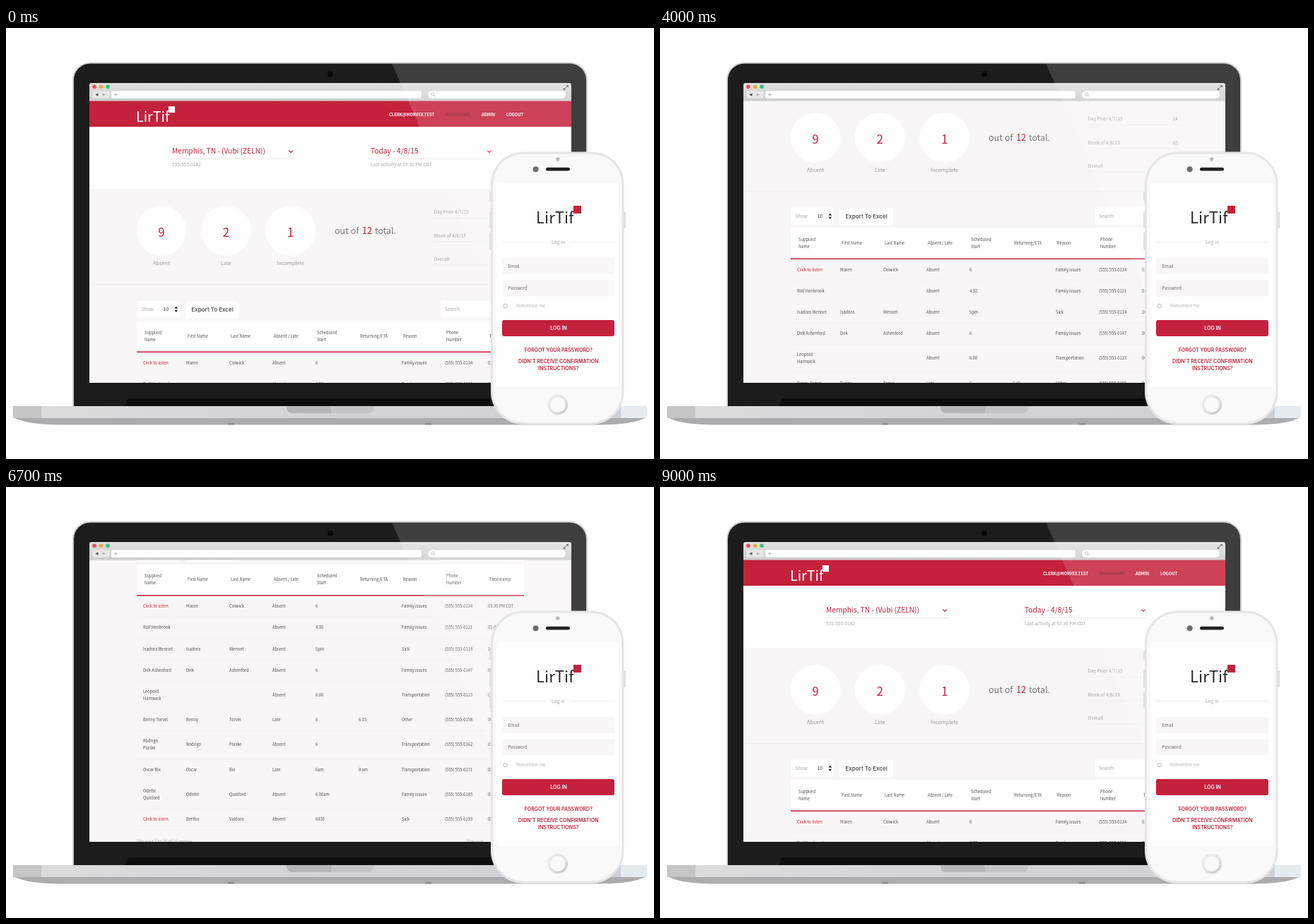
These frames come from a looping animation (917 by 611 pixels, 10 s). An HTML page with a canvas:

```html
<!DOCTYPE html>
<html lang="en">
<head>
<meta charset="utf-8">
<title>Attendance dashboard</title>
<style>
html, body { margin: 0; width: 100%; height: 100%; overflow: hidden; background: #fff; }
canvas { display: block; }
</style>
</head>
<body>
<canvas id="stage" width="917" height="611"></canvas>
<script>
const ctx = document.getElementById('stage').getContext('2d');
const SANS = '"Noto Sans CJK SC", "Noto Sans CJK JP", "Noto Sans CJK", "Open Sans", sans-serif';
const WIDE = 'Inter, "Open Sans", sans-serif';
const RED = '#c4213c', PAPER = '#f8f7f5', LINE = '#f0efed', GREY = '#a5a5a5', INK = '#4c4c4c';
const LOOP = 10000;

const rows = [
  { y: 474.5, cells: ['Click to listen', 'Maren', 'Colwick', 'Absent', '6', '', 'Family issues', '34', '03:30 PM'] },
  { y: 504.5, cells: ['Rolf Henbrook', '', '', 'Absent', '4:30', '', 'Family issues', '21', '01:41 PM'] },
  { y: 535, cells: ['Isadora Wennet', 'Isadora', 'Wennet', 'Absent', '5pm', '', 'Sick', '14', '10:15 AM'] },
  { y: 565, cells: ['Dirk Ashenford', 'Dirk', 'Ashenford', 'Absent', '6', '', 'Family issues', '47', '06:20 AM'] },
  { y: 600, cells: ['Leopold|Harnwick', '', '', 'Absent', '6:00', '', 'Transportation', '23', '06:12 AM'] },
  { y: 635.5, cells: ['Benny Torvel', 'Benny', 'Torvel', 'Late', '6', '6:15', 'Other', '58', '06:05 AM'] },
  { y: 670.5, cells: ['Rodrigo|Plaske', 'Rodrigo', 'Plaske', 'Absent', '6', '', 'Transportation', '62', '05:58 AM'] },
  { y: 706, cells: ['Oscar Bix', 'Oscar', 'Bix', 'Late', '6am', '8 am', 'Transportation', '71', '05:44 AM'] },
  { y: 741, cells: ['Odette|Quillford', 'Odette', 'Quillford', 'Absent', '6:00am', '', 'Family issues', '85', '05:30 AM'] },
  { y: 776.5, cells: ['Click to listen', 'Bertha', 'Valdoro', 'Absent', '6430', '', 'Sick', '93', '05:21 AM'] }
];
const heads = ['Supplied|Name', 'First Name', 'Last Name', 'Absent / Late', 'Scheduled|Start',
  'Returning/ETA', 'Reason', 'Phone|Number', 'Timestamp'];

function rect(x, y, w, h, fill, r = 0) {
  ctx.fillStyle = fill;
  ctx.beginPath();
  ctx.roundRect(x, y, w, h, r);
  ctx.fill();
}

function dot(x, y, r, fill) {
  ctx.fillStyle = fill;
  ctx.beginPath();
  ctx.arc(x, y, r, 0, Math.PI * 2);
  ctx.fill();
}

function poly(fill, ...p) {
  ctx.fillStyle = fill;
  ctx.beginPath();
  for (let i = 0; i < p.length; i += 2) ctx.lineTo(p[i], p[i + 1]);
  ctx.fill();
}

function stroke(color, width, ...p) {
  ctx.strokeStyle = color;
  ctx.lineWidth = width;
  ctx.beginPath();
  for (let i = 0; i < p.length; i += 2) ctx.lineTo(p[i], p[i + 1]);
  ctx.stroke();
}

// y is the middle of the capitals; "|" breaks lines
function text(str, x, y, size, color, { align = 'left', weight = 400, font = SANS } = {}) {
  ctx.font = `${weight} ${size}px ${font}`;
  ctx.textAlign = align;
  ctx.fillStyle = color;
  const lines = str.split('|');
  lines.forEach((line, i) => ctx.fillText(line, x, y + size * 0.36 + (i - (lines.length - 1) / 2) * 10));
}

function fade(x0, y0, x1, y1, ...colors) {
  const g = ctx.createLinearGradient(x0, y0, x1, y1);
  colors.forEach((c, i) => g.addColorStop(i / (colors.length - 1), c));
  return g;
}

function drawBase() {
  ctx.fillStyle = '#acacae';
  ctx.beginPath();
  ctx.moveTo(10, 552);
  ctx.quadraticCurveTo(32, 562.5, 75, 562.5);
  ctx.lineTo(842, 562.5);
  ctx.quadraticCurveTo(885, 562.5, 907, 552);
  ctx.fill();
  rect(314, 560, 9, 2.5, '#8f8f91', 1);
  rect(593, 560, 9, 2.5, '#8f8f91', 1);
  rect(10, 536, 897, 17, fade(50, 0, 870, 0, '#dcdcdd', '#d3d3d6', '#d0d0d4'));
  rect(10, 536, 40, 17, '#c5c5c6');
  rect(870, 536, 37, 17, '#e6ebf0');
  rect(397, 536, 124, 10, '#c4c4c7', [0, 0, 8, 8]);
  rect(397, 536, 63, 10, '#b6b6b9', [0, 0, 0, 8]);
}

function drawLid() {
  rect(94, 48.5, 729, 488, '#cfcfd0', [25, 25, 0, 0]);
  rect(96, 50.5, 725, 485.5, '#1c1c1c', [23, 23, 0, 0]);
  poly('#0d0d0d', 173, 525, 821, 525, 821, 536, 168, 536);
  dot(459, 65.5, 4, '#090909');
}

function chevron(x, y) {
  stroke(RED, 1.3, x - 2.8, y - 1.4, x, y + 1.4, x + 2.8, y - 1.4);
}

function drawTop() {
  rect(118, 90, 682, 50, RED);
  text('LirTif', 184, 125.5, 19.7, '#fff');
  rect(230, 111, 9, 9, '#fff');
  const nav = { weight: 600 };
  text('CLERK@MORVEX.TEST', 542, 122.5, 5.8, '#fff', nav);
  text('DASHBOARD', 622, 122.5, 5.8, '#8b1b30', nav);
  text('ADMIN', 673, 122.5, 5.8, '#fff', nav);
  text('LOGOUT', 708, 122.5, 5.8, '#fff', nav);

  rect(118, 140, 682, 88, '#fff');
  text('Memphis, TN - (Vubi (ZELN))', 235, 174.5, 10.2, RED);
  text('555-555-0182', 235, 194, 6.55, GREY);
  text('Today - 4/8/15', 516, 174.5, 10.2, RED);
  text('Last activity at 03:30 PM CDT', 516, 194, 6.55, GREY);
  for (const x of [232, 513]) {
    rect(x, 185, 175, 1, '#ececec');
    chevron(x + 171, 175);
  }
}

function drawStats() {
  [['9', 'Absent'], ['2', 'Late'], ['1', 'Incomplete']].forEach(([n, label], i) => {
    const x = 220 + i * 91.3;
    dot(x, 287.5, 35.5, '#fff');
    text(n, x, 289.5, 17, RED, { align: 'center' });
    text(label, x, 333, 7.4, '#999', { align: 'center' });
  });
  text('out of', 465, 287.5, 12.5, '#777', { weight: 300 });
  text('12', 504, 287.5, 12.8, RED);
  text('total.', 522, 287.5, 12.3, '#777', { weight: 300 });
  [['Day Prior 4/7/15', '24'], ['Week of 4/8/15', '65'], ['Overall', '525']].forEach(([label, n], i) => {
    const y = 261 + i * 33.2;
    text(label, 605.5, y, 6.55, GREY);
    text(n, 733, y, 6.55, GREY, { align: 'right' });
    rect(605, y + 8, 129, 1, LINE);
  });
  rect(118, 363, 682, 1, LINE);
}

function drawTable() {
  rect(185, 386.5, 61, 24, '#fff', 2);
  text('Show:', 191.5, 398.5, 6.6, GREY);
  text('10', 222.5, 399, 6.8, '#333');
  poly('#222', 238.5, 397.8, 243, 397.8, 240.75, 394.5);
  poly('#222', 238.5, 399.8, 243, 399.8, 240.75, 403);
  rect(254, 387.5, 76, 23.5, '#fff', 2);
  text('Export To Excel', 262.5, 399, 7.95, '#555', { weight: 600, font: WIDE });
  rect(615, 386.5, 119, 24, '#fff', 2);
  text('Search:', 621, 398.5, 6.6, GREY);

  rect(185, 415, 548, 44, '#fff');
  heads.forEach((h, i) => text(h, 196 + i * 61, 436.5, 5.75, INK));
  rect(185, 458.4, 548, 1.5, RED);
  for (const { y, cells } of rows) {
    cells.forEach((c, i) => {
      let s = c;
      if (i === 7) s = '(555) 555-01' + c;
      if (i === 8) s = c + ' CDT';
      text(s, 194 + i * 61, y, 5.75, s.startsWith('Click') ? RED : INK);
    });
    rect(185, y + (cells[0].includes('|') ? 20 : 15), 548, 0.7, '#f2f1ef');
  }
  text('Showing 1 to 10 of 10 entries', 185, 808, 5.9, GREY);
  text('Previous', 652, 808, 5.9, GREY);
}

function drawBrowser() {
  rect(118, 78, 682, 25.5, fade(0, 78, 0, 103, '#e0e0e0', '#cdcdcd'), [3, 3, 0, 0]);
  ['#ea4a5f', '#f2a93b', '#38c172'].forEach((c, i) => dot(125 + i * 9.5, 83.2, 2.8, c));
  rect(122.5, 89.5, 24, 10, '#e9e9e9', 2);
  poly('#555', 126, 94.5, 130.5, 92.3, 130.5, 96.7);
  poly('#aaa', 141, 94.5, 136.8, 92.5, 136.8, 96.5);
  rect(149, 89.3, 439, 10.4, '#fff', 2);
  stroke('#aaa', 0.8, 153, 94.5, 158, 94.5);
  stroke('#aaa', 0.8, 155.5, 92, 155.5, 97);
  rect(597, 89.3, 195, 10.4, '#fff', 5.2);
  ctx.strokeStyle = '#aaa';
  ctx.lineWidth = 0.8;
  ctx.beginPath();
  ctx.arc(603.8, 93.8, 2, 0, Math.PI * 2);
  ctx.stroke();
  stroke('#aaa', 0.8, 605.2, 95.2, 607.4, 97.2);
  stroke('#555', 1, 789.5, 87, 795, 81.8);
  poly('#555', 792.4, 81, 795.8, 81, 795.8, 84.4);
  poly('#555', 788.8, 84.4, 788.8, 87.8, 792.2, 87.8);
}

function drawPhone() {
  rect(684, 232, 4, 13, '#e0e0e0', 1);
  rect(684, 260, 4, 24, '#e0e0e0', 1);
  rect(684, 290, 4, 24, '#e0e0e0', 1);
  rect(873, 260.5, 4, 23.5, '#e0e0e0', 1);
  rect(686, 175.5, 188.5, 386.5, '#e5e5e5', 46);
  rect(689, 178.5, 182.5, 380.5, '#f9f9f9', 43);
  dot(780.8, 186, 2.7, '#b9b9b9');
  dot(749.6, 200.2, 4, '#6d6d6f');
  rect(764, 197.8, 34, 4.8, '#222', 2.4);
  rect(694, 220, 174, 289, '#fff', 3);

  text('LirTif', 750, 268.8, 22.2, '#2b2b2b');
  rect(803, 252, 11, 11, RED);

  rect(702, 303.2, 62, 0.8, '#eee');
  rect(799, 303.2, 62, 0.8, '#eee');
  text('Log in', 781.5, 303.5, 6.8, GREY, { align: 'center' });
  rect(702, 326, 159, 23, PAPER, 2);
  text('Email', 710.5, 337.5, 6.1, '#666');
  rect(702, 357.5, 159, 23, PAPER, 2);
  text('Password', 710.5, 369, 6.1, '#666');
  ctx.strokeStyle = '#aaa';
  ctx.lineWidth = 0.8;
  ctx.beginPath();
  ctx.roundRect(704.2, 391.6, 5, 5, 1);
  ctx.stroke();
  text('Remember me', 722, 394, 6.05, '#b5b5b5');

  const label = { align: 'center', weight: 600, font: WIDE };
  rect(702, 414, 159, 23, RED, 3);
  text('LOG IN', 782, 425.5, 7, '#fff', label);
  text('FORGOT YOUR PASSWORD?', 781.8, 456.3, 7, RED, label);
  text("DIDN'T RECEIVE CONFIRMATION|INSTRUCTIONS?", 781.8, 477.5, 7.1, RED, label);

  ctx.strokeStyle = fade(772, 524, 791, 545, '#ececec', '#e2e2e2', '#c9c9c9');
  ctx.lineWidth = 3.5;
  ctx.beginPath();
  ctx.arc(780.8, 534, 12.5, 0, Math.PI * 2);
  ctx.stroke();
}

// eleven equal jumps, 100 ms apart, the first one right at the start
function steps(t, start) {
  return Math.min(11, Math.max(0, Math.floor((t - start) / 100) + 1)) / 11;
}

function scrollAt(t) {
  return 132 * steps(t, 3000) + 238.3 * steps(t, 6000) - 370.3 * steps(t, 8000);
}

function draw(now) {
  ctx.clearRect(0, 0, 917, 611);
  drawBase();
  drawLid();

  ctx.save();
  ctx.beginPath();
  ctx.rect(118, 103, 682, 400);
  ctx.clip();
  rect(118, 103, 682, 400, PAPER);
  ctx.translate(0, -scrollAt(now % LOOP));
  drawTop();
  drawStats();
  drawTable();
  ctx.restore();

  drawBrowser();
  ctx.save();
  ctx.beginPath();
  ctx.roundRect(96, 50.5, 725, 485.5, [23, 23, 0, 0]);
  ctx.clip();
  poly('rgba(255,255,255,0.15)', 546, 50, 823, 50, 823, 536, 758, 536);
  ctx.restore();
  drawPhone();
  requestAnimationFrame(draw);
}

requestAnimationFrame(draw);
</script>
</body>
</html>
```
